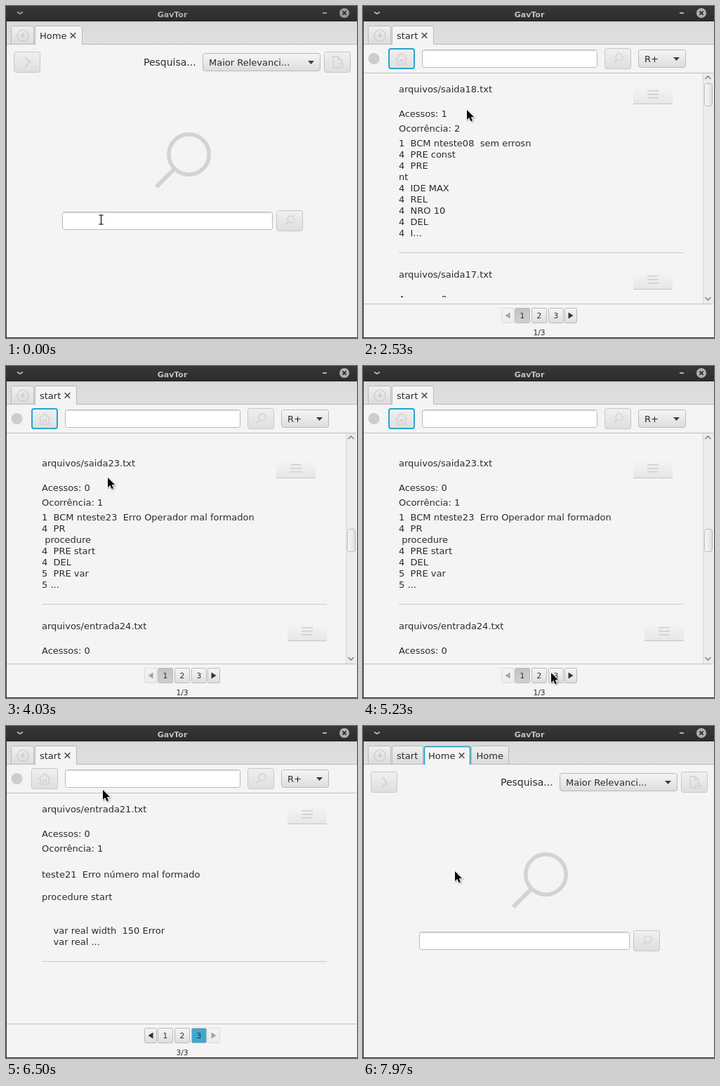
Recreate the animation shown at these times as an HTML page with a canvas. Size 500 by 473 pixels, loop 8 s.

```html
<!DOCTYPE html>
<html lang="pt">
<head>
<meta charset="utf-8">
<title>GavTor</title>
<style>
html, body { margin: 0; width: 100%; height: 100%; overflow: hidden; background: #f4f4f4; }
canvas { display: block; }
</style>
</head>
<body>
<canvas id="stage" width="500" height="473"></canvas>
<script>
const ctx = document.getElementById('stage').getContext('2d', { alpha: false });
const LOOP = 8000;
const BG = '#f4f4f4', EDGE = '#b9b9b9', ICON = '#d0d0d0', INK = '#2b2b2b', BLUE = '#26a5cf';
const SANS = '"DejaVu Sans", Verdana, sans-serif';

// Result texts
const tokens = (head, acc = 0, occ = 2) => ({
  acc, occ,
  lines: [head, '4  PRE const', '4  PRE', 'nt', '4  IDE MAX', '4  REL', '4  NRO 10', '4  DEL', '4  I...']
});
const failed = (n, what) => ({
  name: 'saida' + n, acc: 0, occ: 1,
  lines: [`1  BCM nteste${n}  ${what}n`, '4  PR', ' procedure', '4  PRE start', '4  DEL', '5  PRE var', '5 ...']
});
const input = (n, what) => ({
  name: 'entrada' + n, acc: 0, occ: 1,
  lines: ['', `        teste${n}  ${what}`, '', '', 'procedure s', 'art', '    var string userName', '    ...']
});
const pages = [
  [
    { name: 'saida18', ...tokens('1  BCM nteste08  sem errosn', 1) },
    { name: 'saida17', ...tokens('1  BCM nteste07  sem errosn') },
    { name: 'saida16', ...tokens('1  BCM nteste06  sem errosn') },
    input(23, 'Erro Operador mal formado'),
    failed(23, 'Erro Operador mal formado'),
    input(24, 'Erro Operador mal formado')
  ],
  [failed(24, 'Erro Operador mal formado'), input(22, 'Erro número mal formado')],
  [{
    name: 'entrada21', acc: 0, occ: 1,
    lines: ['', 'teste21  Erro número mal formado', '', 'procedure start', '', '',
      '    var real width  150 Error', '    var real ...']
  }]
];

// Drawing helpers
function rect(x, y, w, h, fill) {
  ctx.fillStyle = fill;
  ctx.fillRect(x, y, w, h);
}
function shade(y, h, top, bottom) {
  const g = ctx.createLinearGradient(0, y, 0, y + h);
  g.addColorStop(0, top);
  g.addColorStop(1, bottom);
  return g;
}
function box(x, y, w, h, r, fill, stroke, lw = 1) {
  ctx.beginPath();
  ctx.roundRect(x + lw / 2, y + lw / 2, w - lw, h - lw, r);
  ctx.fillStyle = fill;
  ctx.fill();
  if (!stroke) return;
  ctx.strokeStyle = stroke;
  ctx.lineWidth = lw;
  ctx.stroke();
}
function text(s, x, y, size = 13, fill = INK, align = 'left', weight = '') {
  ctx.font = `${weight} ${size}px ${SANS}`;
  ctx.textAlign = align;
  ctx.fillStyle = fill;
  ctx.fillText(s, x, y);
}
function line(color, lw, ...pts) {
  ctx.beginPath();
  for (let i = 0; i < pts.length; i += 2) ctx.lineTo(pts[i], pts[i + 1]);
  ctx.strokeStyle = color;
  ctx.lineWidth = lw;
  ctx.stroke();
}
function poly(color, ...pts) {
  ctx.beginPath();
  for (let i = 0; i < pts.length; i += 2) ctx.lineTo(pts[i], pts[i + 1]);
  ctx.fillStyle = color;
  ctx.fill();
}
function ring(x, y, r, color, lw) {
  ctx.beginPath();
  ctx.arc(x, y, r, 0, 7);
  ctx.strokeStyle = color;
  ctx.lineWidth = lw;
  ctx.stroke();
}
function disc(x, y, r, color) {
  ctx.beginPath();
  ctx.arc(x, y, r, 0, 7);
  ctx.fillStyle = color;
  ctx.fill();
}
function cross(x, y, r, color, lw) {
  line(color, lw, x - r, y - r, x + r, y + r);
  line(color, lw, x + r, y - r, x - r, y + r);
}
function clipped(x, y, w, h, draw) {
  ctx.save();
  ctx.beginPath();
  ctx.rect(x, y, w, h);
  ctx.clip();
  draw();
  ctx.restore();
}

// Widgets
function button(x, y, w, h, focus) {
  box(x, y, w, h, 3, shade(y, h, '#f0f0f0', '#dedede'), focus ? BLUE : '#c6c6c6', focus ? 2 : 1);
}
function field(x, y, w, focus) {
  box(x, y, w, 26, 3, '#fff', focus ? BLUE : EDGE, focus ? 2 : 1);
  if (!focus) rect(x + 2, y + 1, w - 4, 2, shade(y + 1, 2, '#dcdcdc', '#fafafa'));
}
function combo(x, y, w, label) {
  box(x, y, w, 26, 3, shade(y, 26, '#f6f6f6', '#dcdcdc'), EDGE);
  text(label, x + 9, y + 18);
  poly('#3c3c3c', x + w - 18, y + 11, x + w - 9, y + 11, x + w - 13.5, y + 16);
}
function lens(x, y) {
  ring(x, y, 5, ICON, 1.3);
  line(ICON, 1.6, x - 3.7, y + 3.7, x - 8, y + 8);
}

function titleBar(active) {
  rect(0, 0, 500, 22, shade(0, 22, '#383838', '#2b2b2b'));
  const c = active ? '#c4c4c4' : '#b4b4b4', b = active ? '#b0b0b0' : '#999';
  text('GavTor', 237, 15.5, 11, c, 'center', 'bold');
  line(b, 2, 16, 8.5, 20, 11, 24, 8.5);
  rect(451, 9, 6, 2, b);
  disc(482, 10, 7, b);
  cross(482, 10, 2.6, '#2e2e2e', 1.8);
}

function tab(x, w, selected, focus) {
  clipped(x - 2, 26, w + 4, selected ? 29 : 28, () => {
    box(x, 28, w, 32, 3, selected ? BG : shade(28, 26, '#f0f0f0', '#dcdcdc'), EDGE);
    if (focus) {
      ctx.beginPath();
      ctx.roundRect(x + 1.5, 29.5, w - 3, 32, 2);
      ctx.strokeStyle = BLUE;
      ctx.lineWidth = 1.6;
      ctx.stroke();
    }
  });
}
function namedTab(label, x, w, selected, focus, textX = x + 7) {
  tab(x, w, selected, focus);
  clipped(x + 1, 28, w - 2, 26, () => text(label, textX, 47));
  if (selected) cross(x + w - 13.5, 42, 3.8, '#4a4a4a', 1.6);
}

function tabs(t) {
  rect(0, 22, 500, 33, shade(22, 33, '#dadada', '#e0e0e0'));
  rect(0, 54, 500, 1, EDGE);
  const blank = t >= 7000 && t < 7600;
  tab(7, 33, blank, blank);
  ring(24, 42, 8, '#c8c8c8', 1.2);
  line('#c8c8c8', 1.4, 20, 42, 28, 42);
  line('#c8c8c8', 1.4, 24, 38, 24, 46);
  if (t < 2030) namedTab('Home', 41, 68, true);
  else if (t < 7000) namedTab('start', 41, 60, true);
  else {
    namedTab('start', 41, 45, false);
    if (blank) {
      const grow = t < 7050 ? 0 : t < 7100 ? 0.5 : 1;
      namedTab('Home', 86, 23 + 30 * grow, false, false, 83.5 + 9.5 * grow);
    } else {
      namedTab('Home', 86, 68, true, true);
      if (t >= 7970) namedTab('Home', 154, 54, false, false, 161.5);
    }
  }
}

function homePage(query, focus) {
  button(11, 65, 38, 30);
  line(ICON, 1.6, 27, 73, 34, 80, 27, 87);
  text('Pesquisa...', 196, 85, 14);
  combo(280, 67, 168, 'Maior Relevanci...');
  button(453, 65, 38, 30);
  line(ICON, 1.3, 474, 88, 466, 88, 466, 72, 473, 72, 478, 77, 478, 81);
  line(ICON, 1.2, 473, 72, 473, 77, 478, 77);
  ring(477, 85, 4, ICON, 1.2);
  line(ICON, 1, 475, 85, 479, 85);
  line(ICON, 1, 477, 83, 477, 87);

  ring(260.5, 211.5, 28.7, '#d3d3d3', 5.6);
  line('#d3d3d3', 6, 241, 231, 214, 258);

  field(80, 293, 300, focus);
  if (focus) {
    text(query, 88, 311);
    rect(Math.round(88 + ctx.measureText(query).width), 298, 1, 16, '#222');
  }
  button(385, 291, 38, 30);
  lens(406, 304);
}

function entry(item, y) {
  const x = item.name[0] === 's' ? 385 : 401;
  text(`arquivos/${item.name}.txt`, 51, y + 5);
  rect(x, y - 8, 56, 30, shade(y - 8, 30, '#f7f7f7', '#e6e6e6'));
  rect(x, y + 21, 56, 1, '#c4c4c4');
  for (let i = 0; i < 3; i++) rect(x + 20, y + 2 + i * 5, 16, 1.5, '#cdcdcd');
  text('Acessos: ' + item.acc, 51, y + 40);
  text('Ocorrência: ' + item.occ, 51, y + 61);
  item.lines.forEach((s, i) => text(s, 51, y + 82 + i * 16));
  const end = y + 89 + item.lines.length * 16;
  rect(51, end, 406, 1, '#cacaca');
  return end + 31;
}

function scrollBar(offset) {
  rect(484, 96, 15, 328, '#ececec');
  rect(484, 96, 1, 328, '#d6d6d6');
  line('#777', 1.3, 487.5, 104, 491.5, 100, 495.5, 104);
  line('#777', 1.3, 487.5, 415, 491.5, 419, 495.5, 415);
  const y = Math.round(110 + offset * 80 / 669);
  const g = ctx.createLinearGradient(486, 0, 498, 0);
  g.addColorStop(0, '#fafafa');
  g.addColorStop(1, '#dedede');
  box(486, y, 12, 33, 3, g, EDGE);
}

function pager(page, moved, pressed) {
  const cell = (x, w, fill) => box(x, 430, w, 22, 2, fill || shade(430, 22, '#f6f6f6', '#dedede'), EDGE);
  const arrow = (x, dir, on) => {
    ctx.globalAlpha = on ? 1 : 0.4;
    cell(x, 18);
    const m = x + 9;
    poly('#333', m + 3.5 * dir, 441, m - 3.5 * dir, 436.5, m - 3.5 * dir, 445.5);
    ctx.globalAlpha = 1;
  };
  arrow(197, -1, page > 0);
  for (let i = 0; i < 3; i++) {
    const x = 216 + i * 24;
    let fill;
    if (i === page) fill = moved ? '#3fa9cf' : shade(430, 22, '#c2c2c2', '#d0d0d0');
    else if (i === pressed) fill = '#cfcfcf';
    cell(x, 22, fill);
    text(i + 1, x + 11, 445, 10.66, INK, 'center');
  }
  arrow(287, 1, page < 2);
  text(`${page + 1}/3`, 251, 469, 10.66, INK, 'center');
}

function results(t) {
  const page = t < 5300 ? 0 : t < 5730 ? 1 : 2;
  const offset = page ? 0 : scrollAt(t);
  disc(15.5, 75, 8, '#cdcdcd');
  button(36, 60, 38, 30, page === 0);
  line(ICON, 1.4, 46.5, 76, 55, 67.5, 63.5, 76);
  line(ICON, 1.4, 49, 75, 49, 83, 53, 83, 53, 77, 57, 77, 57, 83, 61, 83, 61, 75);
  field(84, 62, 250);
  button(344, 60, 38, 30);
  lens(365, 73);
  combo(392, 62, 68, 'R+');
  rect(1, 95, 498, 1, '#c0c0c0');
  rect(1, 424, 498, 1, '#c0c0c0');
  clipped(2, 109, 480, 306, () => {
    pages[page].reduce((y, item) => entry(item, y), 118 - offset);
  });
  if (page < 2) scrollBar(offset);
  const pressed = t >= 4770 && t < 5170 ? 1 : t >= 5470 ? 2 : -1;
  pager(page, page > 0, pressed);
}

// Motion: wheel steps as [time, offset], pointer moves as [start, end, x, y]
const wheel = [[2830, 167], [2915, 334], [3000, 502], [3430, 669], [3670, 786], [3700, 903], [3730, 1020]];
function scrollAt(t) {
  let offset = 0;
  for (const [at, to] of wheel) if (t >= at) offset = to;
  return offset;
}
const moves = [
  [2400, 2530, 148, 148], [3970, 4070, 143, 165], [4070, 4600, 249, 433],
  [5170, 5230, 268, 437], [5730, 5800, 272, 438], [6030, 6230, 145, 94],
  [6470, 6670, 35, 50], [6830, 6830, 34, 50], [7270, 7400, 119, 51], [7970, 7970, 131, 207]
];
function pointerAt(t) {
  let x = 133, y = 306;
  for (const [a, b, toX, toY] of moves) {
    if (t < a) break;
    const p = t >= b ? 1 : (t - a) / (b - a);
    const k = p * p * (3 - 2 * p);
    x += (toX - x) * k;
    y += (toY - y) * k;
  }
  return [Math.round(x), Math.round(y)];
}
function pointer(x, y) {
  ctx.save();
  ctx.translate(x, y);
  ctx.beginPath();
  for (const [px, py] of [[0, 0], [0, 14], [3.2, 11], [5.6, 16.3], [8, 15.2], [5.7, 10.2], [10, 10]]) ctx.lineTo(px, py);
  ctx.closePath();
  ctx.shadowColor = 'rgba(0,0,0,.35)';
  ctx.shadowBlur = 2;
  ctx.shadowOffsetX = ctx.shadowOffsetY = 1;
  ctx.strokeStyle = '#fff';
  ctx.lineWidth = 1.6;
  ctx.stroke();
  ctx.shadowColor = 'transparent';
  ctx.fillStyle = '#0a0a0a';
  ctx.fill();
  ctx.restore();
}
function textPointer(x, y) {
  for (const [c, w] of [['#fff', 3], ['#111', 1.2]]) {
    line(c, w, x, y - 6.5, x, y + 6.5);
    line(c, w, x - 3, y - 6.5, x + 3, y - 6.5);
    line(c, w, x - 3, y + 6.5, x + 3, y + 6.5);
  }
}

const keys = [530, 800, 970, 1035, 1100];

function draw(t) {
  rect(0, 0, 500, 473, BG);
  titleBar(t >= 300);
  tabs(t);
  if (t < 2030) homePage('start'.slice(0, keys.filter(k => t >= k).length), t >= 330);
  else if (t < 7000) results(t);
  else if (t >= 7600) homePage('', false);
  rect(0, 22, 1, 451, '#333');
  rect(0, 472, 500, 1, '#333');
  if (t < 2030) textPointer(135.5, 304.5);
  else pointer(...pointerAt(t));
}

const start = performance.now();
function tick() {
  draw((performance.now() - start) % LOOP);
  requestAnimationFrame(tick);
}
tick();
</script>
</body>
</html>
```
